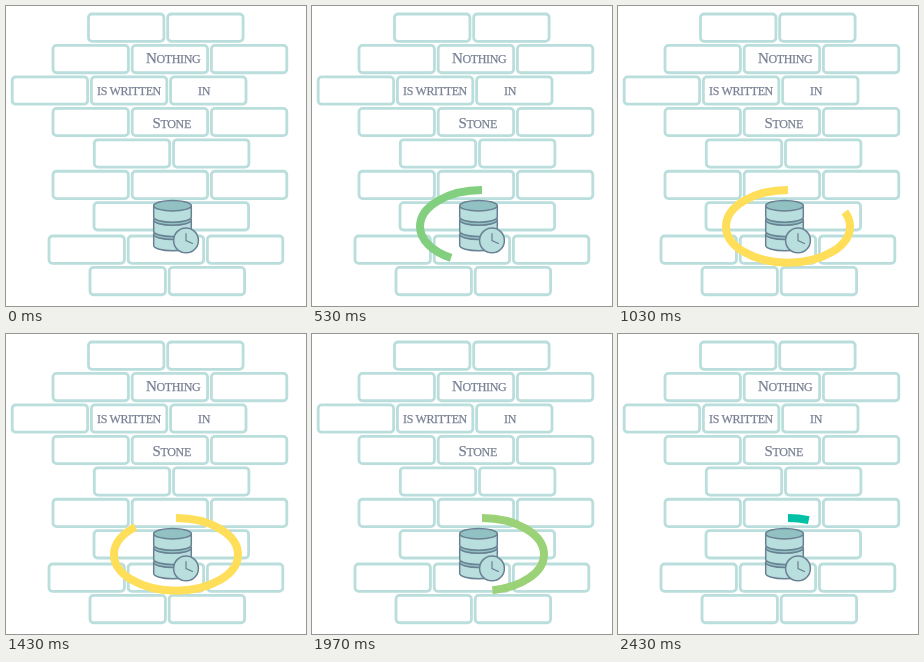
Animation, 300 px wide and 300 px high, one loop 2530 ms. Source, as an HTML page:

```html
<!DOCTYPE html>
<html lang="en">
<head>
<meta charset="utf-8">
<title>Nothing is written in stone</title>
<style>
  html, body { margin: 0; width: 100%; height: 100%; overflow: hidden; background: #fff; }
  svg { display: block; width: 100vw; height: 100vh; }
  text { font: 12px "Liberation Serif", serif; letter-spacing: -.35px; fill: #7a8194; stroke: #7a8194; stroke-width: .25; }
  .cap { font-size: 15px; }
  #bricks { fill: #fff; stroke: #b9dedc; stroke-width: 2.8; }
  #icon { fill: #b8dedd; stroke: #6a8093; stroke-width: 1.5; stroke-linecap: round; }
  #icon ellipse { fill: #91c1c3; }
  #ring { fill: none; stroke-width: 8; }
</style>
</head>
<body>
<svg viewBox="0 0 300 300">
  <g id="bricks"></g>
  <text x="140" y="56.5"><tspan class="cap">N</tspan>OTHING</text>
  <text x="91" y="88.5">IS WRITTEN</text>
  <text x="192" y="88.5">IN</text>
  <text x="146.5" y="121.5"><tspan class="cap">S</tspan>TONE</text>
  <path id="ring" pathLength="15" d="M0-36.3A62 36.3 0 0 0 0 36.3A62 36.3 0 0 0 0-36.3"/>
  <g id="icon">
    <g id="discs"></g>
    <circle cx="180" cy="234.4" r="12.4"/>
    <path fill="none" stroke-width="1.2" d="M180 227.5v7l6.5 3"/>
  </g>
</svg>
<script>
const $ = id => document.getElementById(id);

// Courses of bricks from `top` down, each filled rightwards from its left edge.
function layCourses(top, lefts) {
  lefts.forEach((left, row) => {
    for (let x = left; x < 230; x += 79.2) {
      $('bricks').innerHTML +=
        `<rect x="${x + 1}" y="${top + row * 31.45 + 1}" width="75.4" height="27.3" rx="3.5"/>`;
    }
  });
}
layCourses(7, [81.5, 46, 5.2, 46, 87.3, 46, 87]);
layCourses(229, [42, 83]);

for (let y = 228.3; y > 199; y -= 14.3) {
  $('discs').innerHTML +=
    `<path d="M147.7 ${y}v11.3a18.8 5.2 0 0 0 37.6 0v-11.3"/>
     <ellipse cx="166.5" cy="${y}" rx="18.8" ry="5.2"/>`;
}

const LOOP = 2530;
const DELAY = 25;
const STEP = 82.5;
const STEPS = 15; // steps to draw the ring, and again to erase it

const ring = $('ring');
const start = performance.now();

function draw(now) {
  const time = Math.max(0, now - start) % LOOP;
  const step = Math.min(2 * STEPS - 1, Math.max(0, Math.floor((time - DELAY) / STEP)));
  const erasing = step > STEPS;
  const shown = erasing ? 2 * STEPS - step : step;
  const yellow = Math.min(100, Math.max(0, (shown - 1) / 9.8 * 100));

  // Mirroring turns the arc clockwise, so it shrinks back along its own path.
  ring.setAttribute('transform', `translate(170 220.4) scale(${erasing ? -1 : 1} 1)`);
  ring.setAttribute('stroke-dasharray', `${shown} ${STEPS + 1}`);
  ring.style.stroke = shown ? `color-mix(in srgb, #ffde59 ${yellow}%, #00c0a6)` : 'none';
  requestAnimationFrame(draw);
}
draw(start);
</script>
</body>
</html>
```
